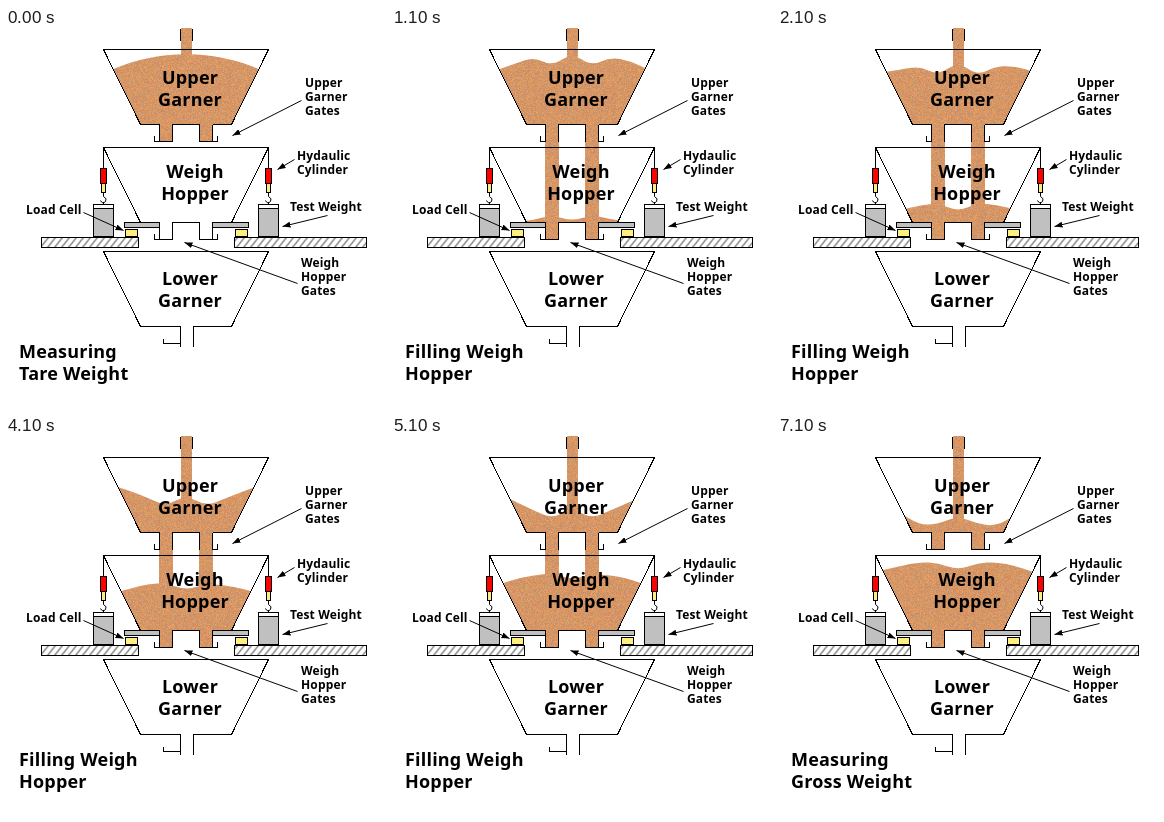
An HTML page with a canvas that plays this animation: 380x380 px, repeating every 8 s.

```html
<!DOCTYPE html>
<html lang="en">
<head>
<meta charset="utf-8">
<title>Weigh hopper cycle</title>
<style>
  html, body { margin: 0; width: 100%; height: 100%; overflow: hidden; background: #fff; }
  canvas, svg { position: absolute; left: 0; top: 0; width: 380px; height: 380px; }
  text { font-family: "Noto Sans", "Open Sans", "DejaVu Sans", sans-serif; font-weight: 700; }
  .big { font-size: 18px; letter-spacing: .2px; }
  .mid { text-anchor: middle; }
  .small { font-size: 12px; letter-spacing: .15px; }
  .line { fill: none; stroke: #000; shape-rendering: crispEdges; }
  .box { stroke: #000; shape-rendering: crispEdges; }
</style>
</head>
<body>
<canvas id="grain" width="380" height="380"></canvas>
<svg viewBox="0 0 380 380">
  <defs>
    <pattern id="hatch" width="7" height="10" y="209" patternUnits="userSpaceOnUse">
      <path d="M-1 10L7 0M6 10L14 0M-8 10L0 0" stroke="#000" stroke-width=".9"/>
    </pattern>
    <marker id="tip" viewBox="0 0 8 6" refX="8" refY="3" markerWidth="8" markerHeight="6"
            markerUnits="userSpaceOnUse" orient="auto"><path d="M0 0L8 3L0 6z"/></marker>
    <g id="rig">
      <path class="line" d="M0 119V140"/>
      <rect class="box" x="-3" y="140" width="6" height="15" fill="#f00"/>
      <rect class="box" x="-2" y="155" width="4" height="9" fill="#ffec80"/>
      <path d="M0 164V168q4 2 2 5q-3 3-5-1" fill="none" stroke="#000"/>
      <path class="line" d="M-10 180V176H10V180M0 173V176"/>
      <rect class="box" x="-10" y="180" width="20" height="28" fill="#c0c0c0"/>
    </g>
    <g id="gates">
      <path class="line" d="M153 0V17M166 17V0H193V17M206 0V17"/>
      <path class="line" d="M148 11V17H153M211 11V17H206"/>
    </g>
  </defs>

  <g transform="translate(.5 .5)">
    <path class="line" d="M153 96H134L97 21H262L225 96H206"/>
    <path class="line" d="M153 194H134L97 119H262L225 194H206"/>
    <path class="line" d="M174 318V298H134L97 223H262L225 298H187V318M157 310V315H174"/>
    <path class="line" d="M174 0V12M186 0V12"/>
    <use href="#gates" y="96"/>
    <use href="#gates" y="194"/>
    <path id="shut" class="line"/>
    <use href="#rig" x="97"/>
    <use href="#rig" x="262"/>
    <g class="box" fill="#c0c0c0">
      <rect x="118" y="194" width="35" height="5"/>
      <rect x="206" y="194" width="36" height="5"/>
    </g>
    <g class="box" fill="#ffee80">
      <rect x="119" y="201" width="12" height="7"/>
      <rect x="229" y="201" width="12" height="7"/>
    </g>
    <g class="box" fill="url(#hatch)">
      <rect x="35" y="209" width="97" height="10"/>
      <rect x="228" y="209" width="132" height="10"/>
    </g>
    <g stroke="#000" marker-end="none">
      <path d="M295 72L226 107" marker-end="url(#tip)"/>
      <path d="M288 131L271 141" marker-end="url(#tip)"/>
      <path d="M321 187L276 198" marker-end="url(#tip)"/>
      <path d="M77 184L117 202" marker-end="url(#tip)"/>
      <path d="M291 255L178 214" marker-end="url(#tip)"/>
    </g>
  </g>

  <g class="big mid">
    <text x="184" y="56">Upper</text><text x="184" y="78">Garner</text>
    <text x="189" y="150">Weigh</text><text x="189" y="172">Hopper</text>
    <text x="184" y="257">Lower</text><text x="184" y="279">Garner</text>
  </g>
  <g class="small">
    <text x="299" y="59">Upper</text><text x="299" y="73">Garner</text><text x="299" y="87">Gates</text>
    <text x="291" y="132">Hydaulic</text><text x="291" y="146">Cylinder</text>
    <text x="284" y="183">Test Weight</text>
    <text x="20" y="186">Load Cell</text>
    <text x="295" y="239">Weigh</text><text x="295" y="253">Hopper</text><text x="295" y="267">Gates</text>
  </g>
  <g class="big">
    <text id="cap1" x="13" y="330"></text>
    <text id="cap2" x="13" y="352"></text>
  </g>
</svg>
<script>
  const $ = id => document.getElementById(id);
  const ctx = $('grain').getContext('2d');
  const LOOP = 8000;

  // Surface heights of the grain at these x positions
  const XS = [105, 122, 142, 160, 180, 200, 218, 238, 255];
  const upper = {
    full:   [42, 35, 30, 27, 26, 27, 30, 35, 42],
    start:  [42, 36, 29, 38, 25, 38, 29, 33, 41],
    high:   [47, 47, 48, 56, 43, 57, 47, 44, 46],
    half:   [49, 54, 62, 70, 59, 70, 63, 55, 49],
    low:    [64, 76, 87, 95, 86, 95, 86, 77, 66],
    refill: [64, 77, 89, 88, 80, 88, 90, 79, 66]
  };
  const weigh = {
    start: [195, 194, 192, 187, 193, 187, 191, 194, 195],
    low:   [176, 170, 163, 163, 174, 163, 163, 169, 176],
    half:  [158, 153, 148, 147, 154, 148, 149, 153, 158],
    high:  [140, 134, 130, 128, 133, 129, 129, 133, 141],
    full:  [134, 130, 126, 127, 134, 127, 126, 130, 136]
  };
  const mean = (a, b) => a.map((v, i) => (v + b[i]) / 2);

  const TARE = ['Measuring', 'Tare Weight'];
  const FILL = ['Filling Weigh', 'Hopper'];
  const GROSS = ['Measuring', 'Gross Weight'];

  // start time, upper surface, weigh surface, gates open, caption
  const steps = [
    [0, upper.full, null, false, TARE],
    [100, upper.full, null, false, TARE],
    [1100, upper.start, weigh.start, true, FILL],
    [2100, mean(upper.start, upper.high), mean(weigh.start, weigh.low), true, FILL],
    [3100, upper.high, weigh.low, true, FILL],
    [4100, upper.half, weigh.half, true, FILL],
    [5100, mean(upper.half, upper.low), mean(weigh.half, weigh.high), true, FILL],
    [6100, upper.low, weigh.high, true, FILL],
    [7100, upper.refill, weigh.full, false, GROSS]
  ];

  function makeGrain() {
    const size = 256, tile = document.createElement('canvas');
    tile.width = tile.height = size;
    const c = tile.getContext('2d');
    const tones = ['#dc935c', '#dc935c', '#e29a5e', '#d08a62', '#d3a067', '#c88e78', '#bf9a70', '#e5a06c'];
    let seed = 7;
    for (let y = 0; y < size; y++) {
      for (let x = 0; x < size; x++) {
        seed = (Math.imul(seed, 1664525) + 1013904223) >>> 0;
        c.fillStyle = tones[seed >>> 29];
        c.fillRect(x, y, 1, 1);
      }
    }
    return ctx.createPattern(tile, 'repeat');
  }
  const grain = makeGrain();

  // Outline of a hopper whose rim sits at height y
  function hopper(y) {
    return new Path2D(`M97 ${y}H263L226 ${y + 75}H207V${y + 92}H193V${y + 75}H167V${y + 92}H153V${y + 75}H134Z`);
  }

  function pile(rim, ys) {
    ctx.save();
    ctx.clip(hopper(rim));
    ctx.beginPath();
    ctx.moveTo(90, rim + 95);
    ctx.lineTo(90, ys[0] + 5);
    ctx.lineTo(XS[0], ys[0]);
    for (let i = 1; i < XS.length - 1; i++) {
      ctx.quadraticCurveTo(XS[i], ys[i], (XS[i] + XS[i + 1]) / 2, (ys[i] + ys[i + 1]) / 2);
    }
    ctx.lineTo(XS[8], ys[8]);
    ctx.lineTo(270, ys[8] + 5);
    ctx.lineTo(270, rim + 95);
    ctx.fill();
    ctx.restore();
  }

  function draw(n) {
    const [, up, down, open, caption] = steps[n];
    ctx.clearRect(0, 0, 380, 380);
    grain.setTransform(new DOMMatrix([1, 0, 0, 1, n * 37, n * 59]));
    ctx.fillStyle = grain;
    ctx.fillRect(175, 0, 11, up[4] + 4);
    pile(21, up);
    if (down) pile(119, down);
    if (open) {
      ctx.fillRect(153, 96, 14, 98);
      ctx.fillRect(193, 96, 14, 98);
    }
    $('shut').setAttribute('d', 'M153 211H166M193 211H206' + (open ? '' : 'M153 113H166M193 113H206'));
    $('cap1').textContent = caption[0];
    $('cap2').textContent = caption[1];
  }

  let shown = -1;
  const begin = performance.now();
  function tick() {
    const t = (performance.now() - begin) % LOOP;
    const n = steps.filter(s => s[0] <= t).length - 1;
    if (n !== shown) draw(shown = n);
    requestAnimationFrame(tick);
  }
  tick();
</script>
</body>
</html>
```
